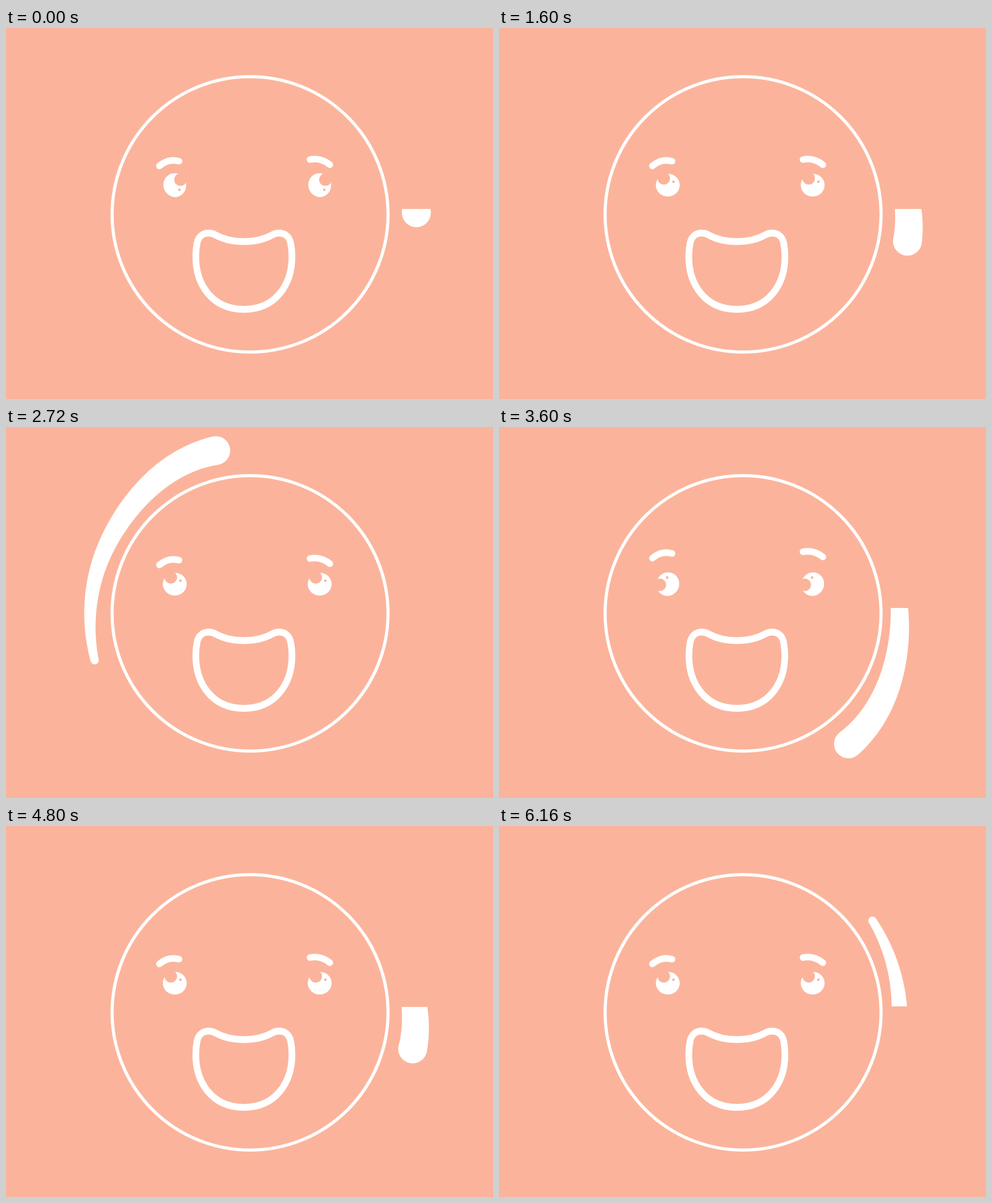
These frames come from a looping animation (857 px wide and 654 px high, 6.24 s). An HTML page with a canvas:

```html
<!DOCTYPE html>
<html>
<head>
<meta charset="utf-8">
<style>
  html, body { margin: 0; width: 100%; height: 100%; overflow: hidden; background: #fbb49b; }
  canvas { display: block; }
</style>
</head>
<body>
<canvas id="stage" width="857" height="654"></canvas>
<script>
const W = 857, H = 654, STEP = 80, LOOP = 6240;
const BG = '#fbb49b', INK = '#fff';
const ctx = document.getElementById('stage').getContext('2d');

const CYCLE = 3168;                 // two laps of the swoosh, one eye roll
const LAPS = [0, 1500, CYCLE, CYCLE + 1500];
const HUB = { x: 427, y: 331 };
const SPAN = 95.2;                  // degrees from head to tail
const HEAD_R = 25.4, TAIL_R = 7.2;

const rad = deg => deg * Math.PI / 180;
const clamp = v => Math.min(1, Math.max(0, v));
const ease = v => { v = clamp(v); return v * v * (3 - 2 * v); };

function disc(x, y, r, color) {
  ctx.fillStyle = color;
  ctx.beginPath();
  ctx.arc(x, y, r, 0, 2 * Math.PI);
  ctx.fill();
}

function polar(r, deg) {
  return [HUB.x + r * Math.cos(rad(deg)), HUB.y + r * Math.sin(rad(deg))];
}

// Accelerating head angle, in degrees clockwise from the right
function headAngle(ms) {
  const s = ms / STEP;
  return -1 + 7.3 * s + 0.4 * s * s + 1.157e-4 * Math.pow(Math.max(0, s), 4.8);
}

// Distance of the swoosh's middle line from the hub, a degrees behind the head
function spine(a) {
  return a < 62
    ? 277.7 + 17.5 * Math.pow(Math.cos(rad(a / 62 * 90)), 3)
    : 277.7 + 5 * Math.pow((a - 62) / (SPAN - 62), 2);
}

const halfWidth = a => HEAD_R + (TAIL_R - HEAD_R) * a / SPAN;

function swoosh(ms) {
  if (ms < -STEP || ms > 20 * STEP) return;
  const head = headAngle(ms);
  if (head > 456) return;
  ctx.save();
  ctx.beginPath();
  if (head < 150) ctx.rect(0, 319, W, H - 319);
  else if (head > 300) ctx.rect(0, 0, W, 318);
  else ctx.rect(0, 0, W, H);
  ctx.clip();

  const n = 80;
  ctx.fillStyle = INK;
  ctx.beginPath();
  for (let i = 0; i <= n; i++) {
    const a = SPAN * i / n;
    ctx.lineTo(...polar(spine(a) + halfWidth(a), head - a));
  }
  for (let i = n; i >= 0; i--) {
    const a = SPAN * i / n;
    ctx.lineTo(...polar(spine(a) - halfWidth(a), head - a));
  }
  ctx.fill();
  disc(...polar(spine(0), head), HEAD_R, INK);
  disc(...polar(spine(SPAN), head - SPAN), TAIL_R, INK);
  ctx.restore();
}

function eye(x, y, turn) {
  ctx.save();
  ctx.translate(x, y);
  ctx.rotate(turn);
  ctx.fillStyle = INK;
  ctx.beginPath();
  ctx.ellipse(0, 0, 21, 20, 0, 0, 2 * Math.PI);
  ctx.fill();
  disc(-7, -12, 11, BG);
  disc(10, -6, 2.3, BG);
  ctx.restore();
}

function brow(x0, y0, cx, cy, x1, y1, lift) {
  ctx.lineWidth = 11.6;
  ctx.lineCap = 'round';
  ctx.beginPath();
  ctx.moveTo(x0, y0 - lift);
  ctx.quadraticCurveTo(cx, cy - lift, x1, y1 - lift);
  ctx.stroke();
}

// Right half of the mouth's upper and lower line, mirrored for the left
function mouth(scale) {
  ctx.save();
  ctx.translate(418.6, 0);
  ctx.scale(scale, 1);
  ctx.lineWidth = 11.8;
  ctx.lineJoin = 'round';
  ctx.beginPath();
  ctx.moveTo(0, 376.5);
  ctx.bezierCurveTo(17.5, 376.5, 35, 373, 49.5, 365);
  ctx.bezierCurveTo(53.5, 362.5, 57.5, 361.5, 62, 361.5);
  ctx.bezierCurveTo(71.5, 361.5, 80, 367, 82.3, 379);
  ctx.bezierCurveTo(84, 387, 84.6, 395, 84.6, 403);
  ctx.bezierCurveTo(84.6, 452, 56, 496, 0, 496);
  ctx.bezierCurveTo(-56, 496, -84.6, 452, -84.6, 403);
  ctx.bezierCurveTo(-84.6, 395, -84, 387, -82.3, 379);
  ctx.bezierCurveTo(-80, 367, -71.5, 361.5, -62, 361.5);
  ctx.bezierCurveTo(-57.5, 361.5, -53.5, 362.5, -49.5, 365);
  ctx.bezierCurveTo(-35, 373, -17.5, 376.5, 0, 376.5);
  ctx.closePath();
  ctx.stroke();
  ctx.restore();
}

function face(ms) {
  ctx.strokeStyle = INK;
  ctx.lineWidth = 5.5;
  ctx.beginPath();
  ctx.arc(429.5, 328.5, 242.8, 0, 2 * Math.PI);
  ctx.stroke();

  // The eye roll begins shortly before the cycle wraps
  const rollTime = (ms + 150) % CYCLE;
  const turn = 2 * Math.PI * clamp(rollTime / 710);
  eye(297, 277, turn);
  eye(552, 277, turn);

  const lift = 14 * Math.sin(Math.PI * clamp(ms / 640));
  brow(270, 243.2, 285.5, 229.5, 304.5, 234.8, lift);
  brow(535, 231.9, 554, 228, 569.8, 241, lift);

  const narrow = ease((ms - 400) / 320) - ease((ms - 1280) / 240);
  mouth(1 - 0.1 * narrow);
}

function draw(t) {
  ctx.fillStyle = BG;
  ctx.fillRect(0, 0, W, H);
  face(t % CYCLE);
  for (const start of LAPS) swoosh(t - start);
}

let begin = null;
function tick(now) {
  if (begin === null) begin = now;
  const t = (now - begin) % LOOP;
  draw(Math.floor(t / STEP) * STEP);
  requestAnimationFrame(tick);
}
draw(0);
requestAnimationFrame(tick);
</script>
</body>
</html>
```
